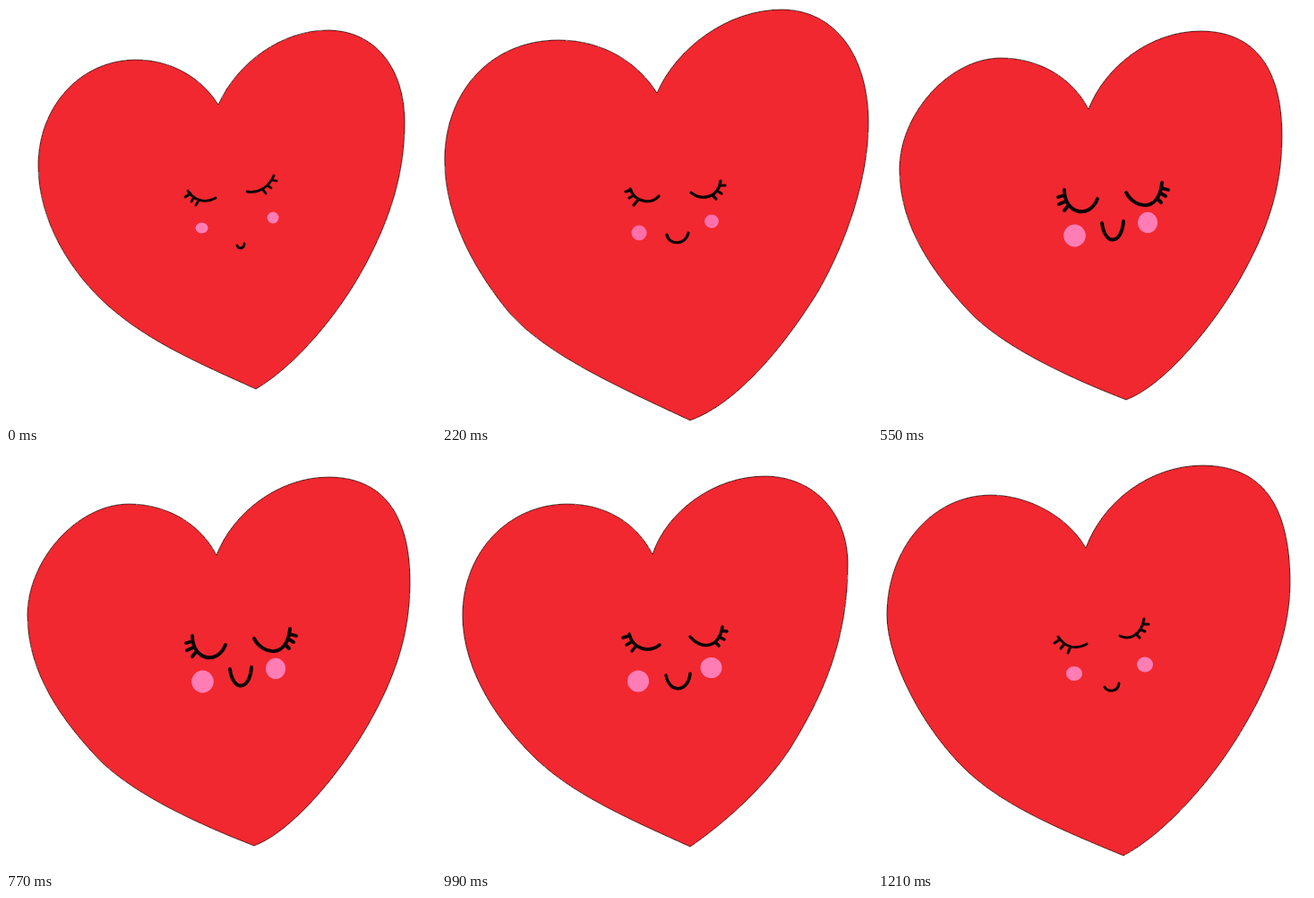
Recreate the animation shown at these times as an HTML page. Size 480 by 466 pixels, loop 1.32 s.

```html
<!DOCTYPE html>
<html lang="en">
<head>
<meta charset="utf-8">
<title>Beating heart</title>
<style>
html, body { margin: 0; width: 100%; height: 100%; overflow: hidden; background: #fff; }
svg { display: block; width: 100%; height: 100%; }
</style>
</head>
<body>
<svg viewBox="0 0 480 466">
  <path id="heart" fill="#f1282f" stroke="#1a0505" stroke-width=".7" stroke-linejoin="round" shape-rendering="crispEdges"/>
  <path id="cheeks"/>
  <path id="face" fill="none" stroke="#080405" stroke-linecap="round" stroke-linejoin="round"/>
</svg>
<script>
const STEP = 110;
const PINK = '#ff7db5';

// Paths share one structure, so any two poses can be blended number by number.
function mix(a, b, k) {
  const target = b.match(/[\d.]+/g);
  let i = 0;
  return a.replace(/[\d.]+/g, n => +(+n + (target[i++] - n) * k).toFixed(2));
}

function blend(a, b, k) {
  return {
    heart: mix(a.heart, b.heart, k),
    face: mix(a.face, b.face, k),
    cheeks: a.cheeks.map((n, i) => n + (b.cheeks[i] - n) * k),
    line: a.line + (b.line - a.line) * k,
    pink: a.pink
  };
}

const asleep = {
  heart: 'M237,110C218,80 185,60 145,60C83,60 36,112 36,178C36,238 71,297 116,336C160,374 212,397 279,427' +
    'C322,402 372,344 402,287C428,238 445,188 445,130C445,68 411,27 359,27C308,27 258,63 237,110Z',
  face: 'M203,206C209,216 222,221 234,214M200,213L206,209M207,218L210,213M212,222L215,217' +
    'M269,207C283,209 294,201 299,189M302,195L297,194M296,203L292,200M290,209L287,205' +
    'M258,267C259,271 266,271 266,265',
  cheeks: [218.5, 247.5, 7, 6, 298, 236, 6.5, 6.5],
  line: 2.8, pink: PINK
};

const stirring = {
  heart: 'M232,107C212,72 168,48 126,48C60,48 10,108 10,182C10,232 52,313 103,359C144,396 206,422 274,450' +
    'C320,426 376,364 412,300C441,250 460,196 460,146C460,58 428,15 362,15C304,15 251,55 232,107Z',
  face: 'M201,206C210,219 222,220 233,214M197,213L203,209M204,219L208,214M212,224L215,217' +
    'M270,205C280,210 294,205 297,186M302,192L296,192M298,200L293,198M292,207L288,203' +
    'M253,262C256,268 268,268 269,258',
  cheeks: [219, 247, 9, 8, 298, 237, 9, 8.5],
  line: 3, pink: PINK
};

const swollen = {
  heart: 'M240,97C220,65 182,38 130,38C55,38 3,95 3,172C3,238 40,300 76,343C118,390 200,426 277,462' +
    'C330,443 383,378 420,318C452,262 476,192 476,130C476,56 439,4 379,4C318,4 261,48 240,97Z',
  face: 'M210,204C216,220 234,221 242,212M205,207L211,205M209,214L214,211M214,222L219,216' +
    'M278,208C289,217 308,215 311,195M316,200L310,200M312,209L307,206M306,215L302,211' +
    'M251,255C253,267 272,267 275,253',
  cheeks: [220, 253, 8.5, 8.5, 301, 240, 8, 7.5],
  line: 3.2, pink: '#ff6faa'
};

const smiling = {
  heart: 'M235,114C217,79 183,58 140,58C74,58 23,112 23,182C23,246 66,306 108,345C150,384 215,412 277,440' +
    'C311,417 360,375 389,330C425,272 453,210 453,125C453,70 417,27 360,27C304,27 251,66 235,114Z',
  face: 'M209,203C213,219 230,225 243,215M202,207L209,205M206,215L211,212M212,222L216,217' +
    'M277,206C288,220 309,220 313,195M318,200L312,199M315,209L309,206M309,216L305,212' +
    'M250,249C254,270 275,268 277,247',
  cheeks: [219, 255.5, 12, 12, 300.5, 240.5, 12, 11.5],
  line: 3.5, pink: PINK
};

const beaming = {
  heart: 'M235,115C217,80 180,58 137,58C80,58 24,120 24,182C24,246 62,300 108,347C148,384 215,415 277,439' +
    'C320,423 375,356 406,301C434,251 451,204 451,145C451,70 421,28 360,28C304,28 253,68 235,115Z',
  face: 'M208,205C208,232 236,238 245,215M201,213L208,211M202,221L209,218M208,228L212,223' +
    'M277,208C287,227 314,230 317,197M324,205L317,203M321,212L316,209M316,219L312,215' +
    'M250,242C253,267 272,267 274,240',
  cheeks: [219.5, 256, 12.3, 12.5, 301, 241.5, 11, 11.8],
  line: 3.9, pink: PINK
};

const settling = { ...blend(smiling, beaming, .5), heart: mix(asleep.heart, smiling.heart, .3) };
const peak = { ...beaming, heart: mix(beaming.heart, swollen.heart, .75) };

const poses = [asleep, stirring, swollen, smiling, settling, beaming, peak];
const LAST = poses.length - 1;

const [heart, cheeks, face] = ['heart', 'cheeks', 'face'].map(id => document.getElementById(id));

const oval = (x, y, rx, ry) =>
  `M${x - rx},${y}a${rx},${ry} 0 1 0 ${2 * rx},0a${rx},${ry} 0 1 0 ${-2 * rx},0Z`;

function draw(time) {
  // Forward through the poses, then back again.
  const step = Math.floor(time / STEP) % (2 * LAST);
  const pose = poses[LAST - Math.abs(LAST - step)];
  heart.setAttribute('d', pose.heart);
  face.setAttribute('d', pose.face);
  face.setAttribute('stroke-width', pose.line);
  cheeks.setAttribute('d', oval(...pose.cheeks.slice(0, 4)) + oval(...pose.cheeks.slice(4)));
  cheeks.setAttribute('fill', pose.pink);
}

const start = performance.now();
function tick() {
  draw(performance.now() - start);
  requestAnimationFrame(tick);
}
tick();
</script>
</body>
</html>
```
